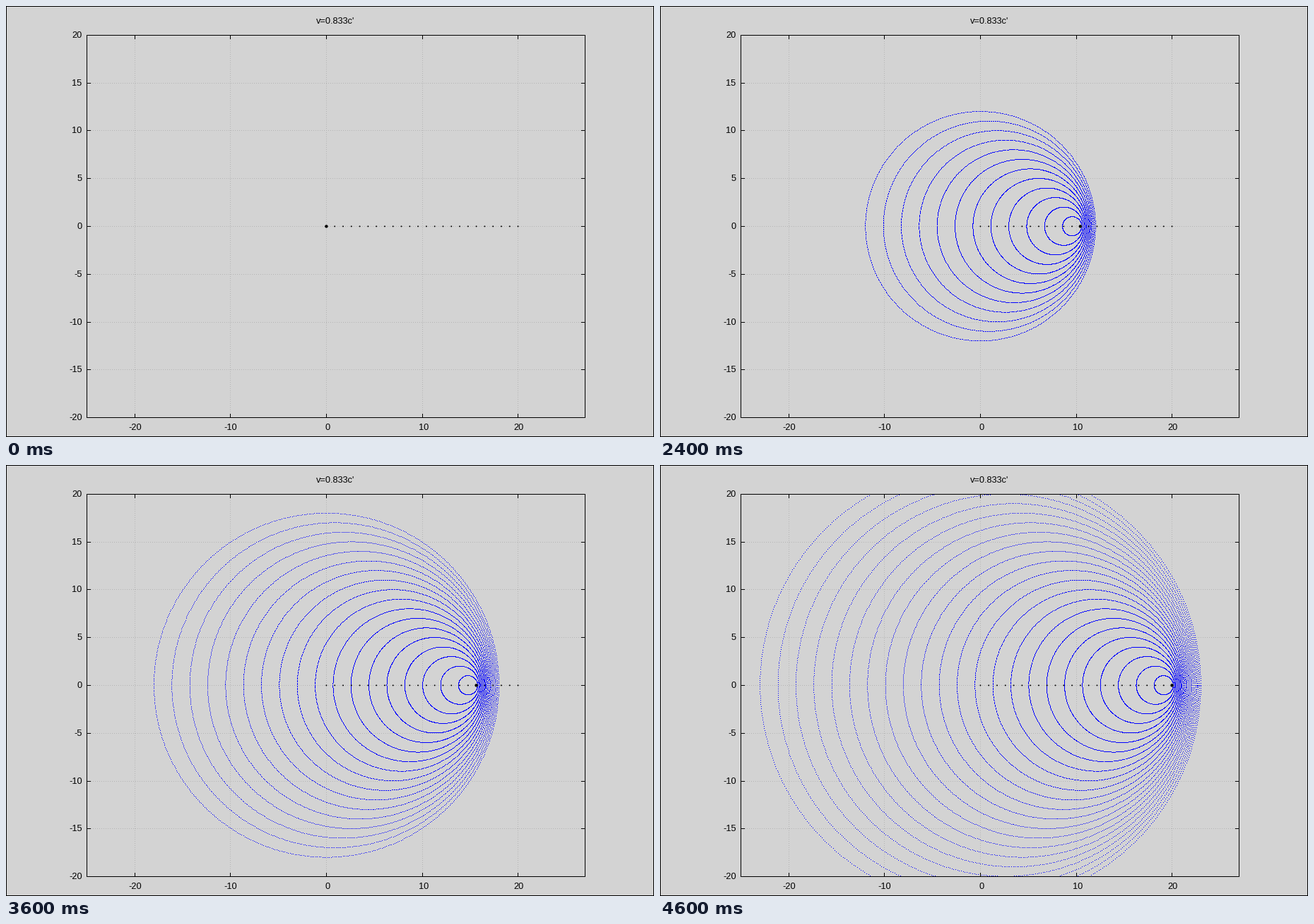
These frames come from a looping animation (917x611 px, 4800 ms). A matplotlib script:

```python
import numpy as np
import matplotlib.pyplot as plt
from matplotlib.animation import FuncAnimation
from matplotlib.patches import Circle

W, H, DPI = 917, 611, 64
PX = 72 / DPI                                # points per pixel
LEFT, RIGHT, TOP, BOTTOM = 114, 819, 41, 583
SX, SY = (RIGHT - LEFT) / 52, (BOTTOM - TOP) / 40
STEPS = 24
BG, GRID, BLUE, BLACK = (211, 211, 211), (180, 180, 180), (0, 0, 255), (0, 0, 0)
FONT = dict(family="Liberation Sans", size=12.7 * PX, color="black",
            va="baseline")

theta = np.arange(0, 2 * np.pi, 0.01)
source = np.linspace(0, 20, STEPS)           # emitter position at each step
xticks = range(-20, 21, 10)
yticks = range(-20, 21, 5)


def to_col(x):
    return np.rint(453.02 + SX * np.asarray(x)).astype(int)


def to_row(y, centre=311.7):
    return np.rint(centre - SY * np.asarray(y)).astype(int)


fig = plt.figure(figsize=(W / DPI, H / DPI), dpi=DPI)
ax = fig.add_axes([0, 0, 1, 1])
ax.axis("off")

base = np.full((H, W, 3), BG, np.uint8)
ink = np.zeros((H, W), bool)                 # black frame and ticks


def box(x0, y0, x1, y1):
    ink[[y0, y1], x0:x1 + 1] = True
    ink[y0:y1 + 1, [x0, x1]] = True


box(0, 0, W - 1, H - 1)
box(LEFT, TOP, RIGHT, BOTTOM)

for v in xticks:
    c = to_col(v)
    base[TOP:BOTTOM:3, c] = GRID
    ink[TOP:TOP + 6, c] = ink[BOTTOM - 5:BOTTOM + 1, c] = True
    shift = 1.7 if v >= 0 else 0.5
    ax.text(c + shift, 601, str(v), ha="center", **FONT)
for v in yticks:
    r = to_row(v, 312)
    base[r, LEFT:RIGHT:3] = GRID
    ink[r, LEFT:LEFT + 6] = ink[r, RIGHT - 5:RIGHT + 1] = True
    ax.text(107.5, r + 4, str(v), ha="right", **FONT)
ax.text(466.5, 25, "v=0.833c'", ha="center", **FONT)

canvas = ax.imshow(base, extent=(0, W, H, 0), interpolation="nearest",
                   aspect="auto")
ax.set(xlim=(0, W), ylim=(H, 0))


def dot(x, radius):
    return ax.add_patch(Circle((x, 312.4), radius, fc="black", lw=0, zorder=4))


path_x = 453.4 + SX * source
for x in path_x:
    dot(x, 0.95)
emitter = dot(path_x[0], 2.2)


def draw(n):
    img = base.copy()
    for k in range(n):
        radius = n - k
        col = to_col(source[k] + radius * np.cos(theta))
        row = to_row(radius * np.sin(theta))
        inside = (row > TOP) & (row < BOTTOM) & (col > LEFT) & (col < RIGHT)
        img[row[inside], col[inside]] = BLUE
    img[ink] = BLACK
    canvas.set_data(img)
    emitter.set_center((path_x[n], 312.4))
    return canvas, emitter


anim = FuncAnimation(fig, draw, frames=STEPS, interval=200,
                     repeat=True, repeat_delay=0, blit=False)
plt.show()
```
